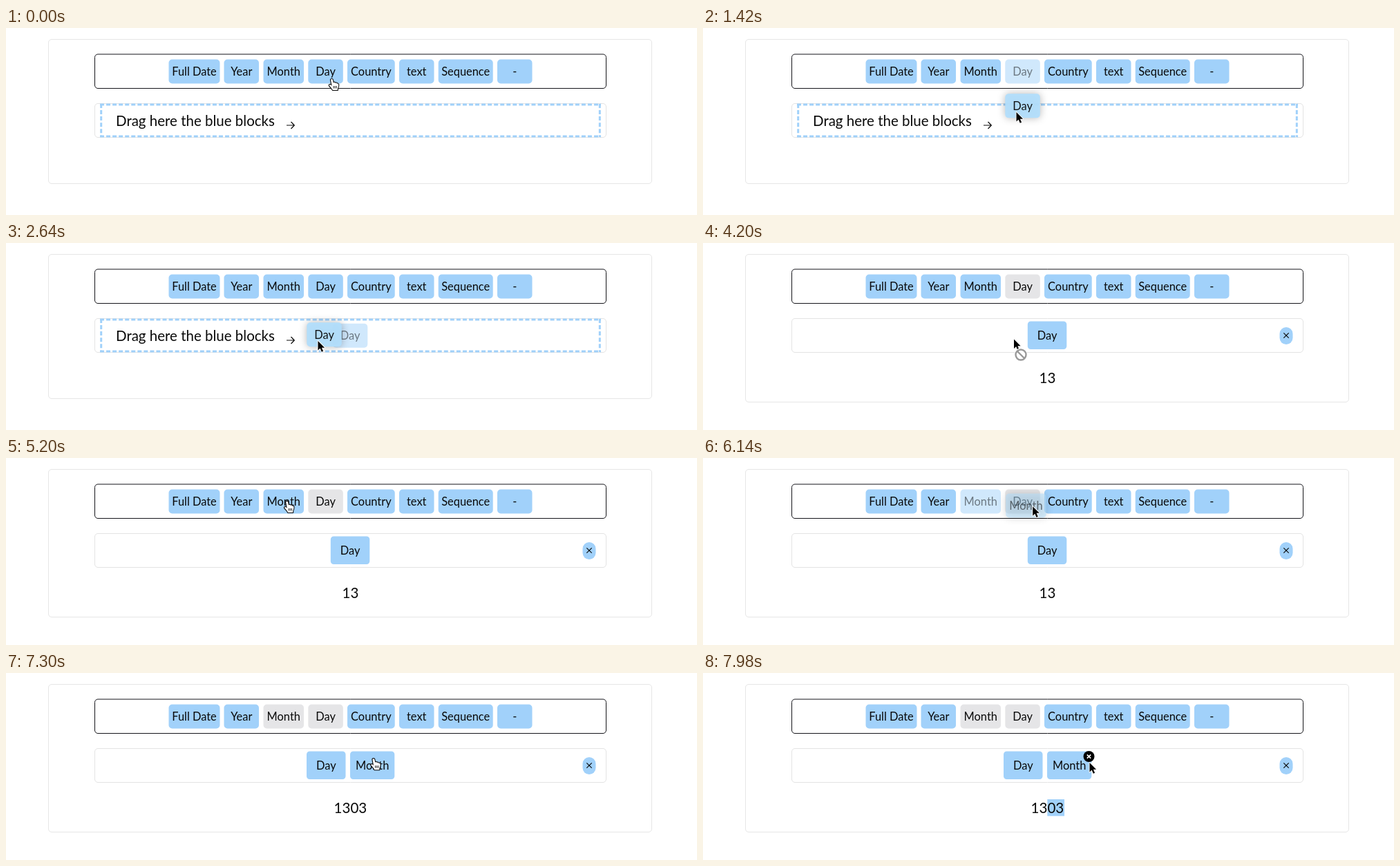
Recreate the animation shown at these times as an HTML page with a canvas. Size 1000 by 271 pixels, loop 8000 ms.

```html
<!DOCTYPE html>
<html lang="en">
<head>
<meta charset="utf-8">
<title>Drag and drop blocks</title>
<style>
html, body { margin: 0; width: 100%; height: 100%; overflow: hidden; background: #fff; }
canvas { display: block; width: 1000px; height: 271px; }
</style>
</head>
<body>
<canvas id="stage"></canvas>
<script>
const canvas = document.getElementById('stage');
const ctx = canvas.getContext('2d');
const ratio = window.devicePixelRatio || 1;
canvas.width = 1000 * ratio;
canvas.height = 271 * ratio;

const LOOP = 8000;
const BLUE = '#a1d1fa', GRAY = '#e5e5e7', INK = '#0a0a0a';
const SMALL = 16.4, LARGE = 20.5;
const CHIP_Y = 45.5, CHIP_H = 35;
const CHIPS = [
  ['Full Date', 235.5, 74], ['Year', 315.5, 50.5], ['Month', 372.5, 58.5], ['Day', 437.3, 50.5],
  ['Country', 494, 68.7], ['text', 569, 50.5], ['Sequence', 625.7, 79], ['-', 711, 50.5]
].map(([label, x, w]) => ({ label, x, w }));
const MONTH = CHIPS[2], DAY = CHIPS[3];

// Moments of the story, in ms
const T = {
  dayDrag: 1380, dayOver: 1560, dayDrop: 3080, leave: 4240, overMonth: 4560,
  monthDrag: 5640, monthOver: 6420, release: 6700, monthDrop: 7280, hover: 7420
};

// Cursor path: time, x, y
const PATH = [
  [0, 476.5, 76], [600, 476.5, 76], [1250, 453.5, 73], [1380, 453.5, 105], [1420, 453.5, 122],
  [1700, 453, 142], [2050, 452, 152], [2640, 451.5, 142], [3000, 450, 139.5], [4220, 450, 139.5],
  [4640, 412, 66], [5640, 411.5, 64], [5900, 434, 65], [6140, 477, 70], [6320, 511, 101],
  [6740, 536, 126], [7280, 536, 126], [7800, 559.5, 130], [LOOP, 559.5, 130]
];

const clamp = v => Math.max(0, Math.min(1, v));
const mix = (a, b, k) => a + (b - a) * k;
const ease = k => { k = clamp(k); return k * k * (3 - 2 * k); };

function cursorAt(t) {
  const i = Math.max(1, PATH.findIndex(p => p[0] > t));
  const [t0, x0, y0] = PATH[i - 1], [t1, x1, y1] = PATH[i];
  const k = (t - t0) / (t1 - t0);
  return { x: mix(x0, x1, k), y: mix(y0, y1, k) };
}

function box(x, y, w, h, r, fill, stroke) {
  ctx.beginPath();
  ctx.roundRect(x, y, w, h, r);
  if (fill) { ctx.fillStyle = fill; ctx.fill(); }
  if (stroke) { ctx.strokeStyle = stroke; ctx.lineWidth = 1; ctx.stroke(); }
}

function text(str, x, y, size, align = 'center') {
  ctx.font = `${size}px Lato, sans-serif`;
  ctx.textAlign = align;
  ctx.fillStyle = INK;
  ctx.fillText(str, x, y);
}

function line(points, color, width) {
  ctx.beginPath();
  points.forEach(([x, y, move]) => move ? ctx.moveTo(x, y) : ctx.lineTo(x, y));
  ctx.strokeStyle = color;
  ctx.lineWidth = width;
  ctx.stroke();
}

function chip({ label, w }, x, y, { fill = BLUE, alpha = 1, shadow = false } = {}) {
  ctx.save();
  ctx.globalAlpha = alpha;
  if (shadow) {
    ctx.shadowColor = 'rgba(0,0,0,.3)';
    ctx.shadowBlur = 12 * ratio;
  }
  box(x, y, w, CHIP_H, 5, fill);
  ctx.shadowColor = 'transparent';
  text(label, x + w / 2, y + 23.3, SMALL);
  ctx.restore();
}

function block(label, x, w) {
  box(x, 113.5, w, 40.5, 4.5, BLUE);
  text(label, x + w / 2, 140, SMALL);
}

function cross(x, y, r, color, width) {
  line([[x - r, y - r, 1], [x + r, y + r], [x + r, y - r, 1], [x - r, y + r]], color, width);
}

function palette(t) {
  box(128.5, 38, 740, 49.5, 4.5, '#fff', '#15151a');
  for (const c of CHIPS) {
    const used = c === DAY && t >= T.dayDrop || c === MONTH && t >= T.monthDrop;
    const lifted = c === DAY && t >= T.dayDrag && t < T.dayOver ||
      c === MONTH && t >= T.monthDrag && t < T.monthOver;
    chip(c, c.x, CHIP_Y, { fill: used ? GRAY : BLUE, alpha: lifted ? .5 : 1 });
  }
}

function emptyZone(t) {
  ctx.setLineDash([6, 3.05]);
  line([[136, 111, 1], [861, 111], [136, 157, 1], [861, 157],
    [137.7, 110, 1], [137.7, 158], [859.3, 110, 1], [859.3, 158]], BLUE, 3);
  ctx.setLineDash([]);
  text('Drag here the blue blocks', 159, 142, LARGE, 'left');
  line([[406, 141, 1], [417, 141], [412.5, 136, 1], [417.3, 141], [412.5, 146]], INK, 1.2);
  if (t >= T.dayOver) chip(DAY, 472.8, 116.7, { alpha: .5 });
}

function filledZone(t) {
  const dropped = t >= T.monthDrop;
  const shift = ease((t - T.monthOver) / 200);
  block('Day', dropped ? 435 : mix(469.8, 438.2, shift), 56.5);
  if (dropped) block('Month', 498, 64.3);
  else if (t >= T.monthOver) chip(MONTH, 500.6, 116.7, { alpha: .5 });

  box(834.5, 122, 19, 25, 9.5, BLUE);
  cross(844, 134, 3.7, INK, 1.2);

  const hover = t >= T.hover;
  if (hover) {
    ctx.fillStyle = BLUE;
    ctx.fillRect(498.3, 183, 24.7, 24.3);
  }
  text(dropped ? '1303' : '13', 498.4, 203, LARGE);
  if (hover) {
    ctx.beginPath();
    ctx.arc(558.5, 121, 8, 0, 7);
    ctx.fillStyle = '#000';
    ctx.fill();
    cross(558.5, 121, 2.7, '#fff', 1.7);
  }
}

function carried(t, p) {
  if (t >= T.dayDrag && t < T.dayDrop) {
    chip(DAY, p.x - 16.2, p.y - 26.7, { fill: '#b3dffc', alpha: .95, shadow: true });
  } else if (t >= T.monthDrag && t < T.monthDrop) {
    const alpha = mix(.55, .95, clamp((t - 6150) / 250));
    chip(MONTH, p.x - 39, p.y - 18.6, { fill: '#b3dffc', alpha, shadow: true });
  }
}

function drawPath(d, x, y, fill, stroke, width) {
  ctx.save();
  ctx.translate(x, y);
  const path = new Path2D(d);
  ctx.lineJoin = 'round';
  ctx.lineWidth = width;
  ctx.strokeStyle = stroke;
  ctx.stroke(path);
  ctx.fillStyle = fill;
  ctx.fill(path);
  ctx.restore();
}

const ARROW = 'M0 0V13.5L3.1 10.6L5.3 15.8L7.6 14.8L5.4 9.7H9.6Z';
const HAND = 'M-1.5 1.2C-1.5-.4 1.1-.4 1.4 1.2L2.3 5.4C3.2 4.5 4.7 4.8 5 5.9C6 5.2 7.3 5.6 7.6 6.7' +
  'C8.7 6.3 9.7 7 9.7 8.2C9.8 10.8 9.2 12.4 8.4 14V16H1.3C.8 14.2-1.3 12.4-3.5 9.7' +
  'C-4.3 8.5-2.7 7.5-1.6 8.4L0 9.8Z';

function cursor(t, p) {
  const hand = t < T.dayDrag || t >= T.overMonth && t < T.monthDrag || t >= T.release && t < T.hover;
  if (hand) {
    const x = p.x - 5, y = p.y - 2;
    drawPath(HAND, x, y, '#fff', INK, 2.2);
    line([[x + 2.6, y + 10, 1], [x + 2.6, y + 13.5], [x + 4.7, y + 10, 1], [x + 4.7, y + 13.5],
      [x + 6.8, y + 10, 1], [x + 6.8, y + 13.5]], INK, .9);
    return;
  }
  drawPath(ARROW, p.x, p.y, '#000', '#fff', 1.8);
  if (t >= T.dayDrop && t < T.leave) {
    const x = p.x + 10, y = p.y + 22.5;
    for (const [color, width] of [['#fff', 4.5], ['#999', 2.4]]) {
      ctx.beginPath();
      ctx.arc(x, y, 7.5, 0, 7);
      ctx.fillStyle = '#fff';
      if (color === '#fff') ctx.fill();
      ctx.strokeStyle = color;
      ctx.lineWidth = width;
      ctx.stroke();
      line([[x - 5, y - 5, 1], [x + 5, y + 5]], color, width);
    }
  }
}

function draw(t) {
  const filled = t >= T.dayDrop;
  const p = cursorAt(t);
  ctx.setTransform(ratio, 0, 0, ratio, 0, 0);
  ctx.fillStyle = '#fff';
  ctx.fillRect(0, 0, 1000, 271);
  box(61.5, 16.5, 873, filled ? 214 : 209, 4.5, '#fff', '#e6e6e6');
  palette(t);
  box(128.5, 109.5, 740, 49, 4.5, '#fff', '#e3e3e3');
  if (filled) filledZone(t);
  else emptyZone(t);
  carried(t, p);
  cursor(t, p);
}

const start = performance.now();
function tick() {
  draw((performance.now() - start) % LOOP);
  requestAnimationFrame(tick);
}
tick();
</script>
</body>
</html>
```
